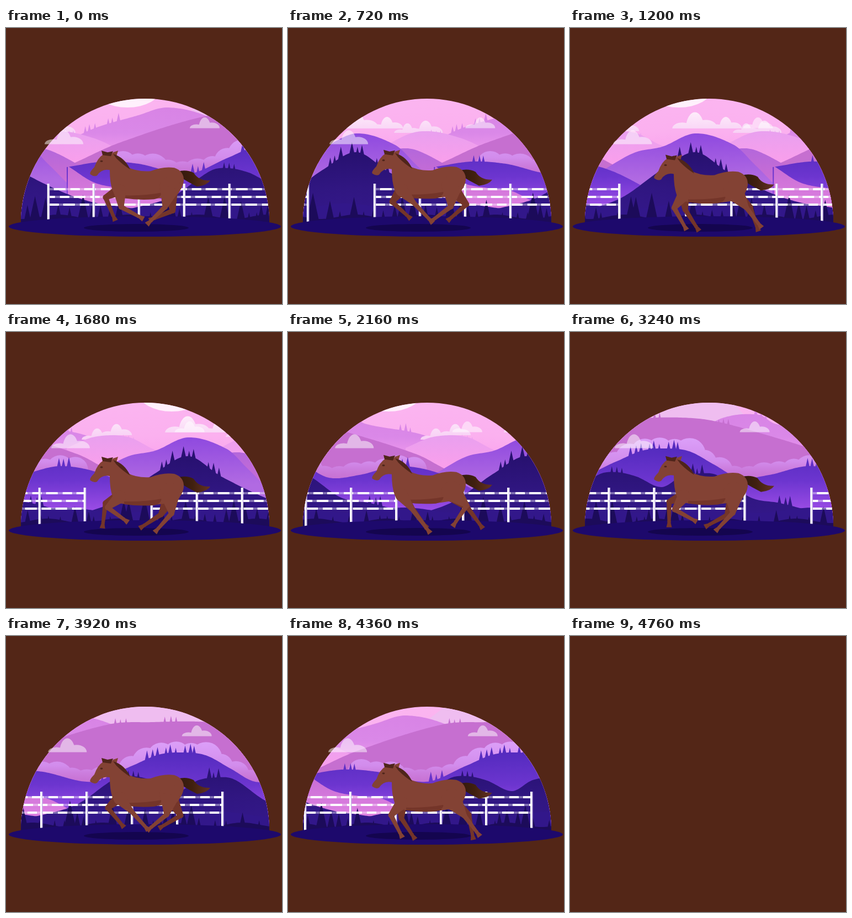
Write an HTML page with a canvas that moves like this. It is 500x500 px and loops after 4800 ms.

```html
<!DOCTYPE html>
<html lang="en">
<head>
<meta charset="utf-8">
<style>
  html, body { margin: 0; height: 100%; overflow: hidden; background: #532617; }
  canvas { display: block; }
</style>
</head>
<body>
<canvas id="stage" width="500" height="500"></canvas>
<script>
const c = document.getElementById('stage').getContext('2d');
const LOOP = 4800, VISIBLE = 4760, STRIDE = VISIBLE / 6;
const PANORAMA = 1014, FENCE = 531, TAU = 2 * Math.PI;

let seed = 7;
const random = () => (seed = seed * 16807 % 2147483647) / 2147483647;
const wave = (phase, peak) => Math.cos(TAU * (phase - peak));

function vertical(y0, y1, ...colors) {
  const g = c.createLinearGradient(0, y0, 0, y1);
  colors.forEach((col, i) => g.addColorStop(i / (colors.length - 1), col));
  return g;
}

// Height function through [x, y] points (Hermite spline)
function spline(points) {
  const slope = i => {
    const a = points[Math.max(i - 1, 0)], b = points[Math.min(i + 1, points.length - 1)];
    return (b[1] - a[1]) / (b[0] - a[0]);
  };
  return x => {
    const i = Math.max(0, points.findLastIndex((p, n) => p[0] <= x && n < points.length - 1));
    const [x0, y0] = points[i], [x1, y1] = points[i + 1];
    const w = x1 - x0, t = (x - x0) / w, s = 1 - t;
    return y0 * s * s * (1 + 2 * t) + y1 * t * t * (3 - 2 * t) + w * s * t * (s * slope(i) - t * slope(i + 1));
  };
}

function tree(path, x, base, h, spread) {
  path.moveTo(x - h * spread, base);
  path.lineTo(x, base - h);
  path.lineTo(x + h * spread, base);
}

function land(from, to, height) {
  const path = new Path2D();
  path.moveTo(from, 365);
  for (let x = from; x <= to; x += 3) path.lineTo(x, height(x));
  path.lineTo(to, 365);
  path.closePath();
  return path;
}

// A hill with small groves of trees standing on its ridge
function hill(fill, points, groves = [], size = 8) {
  const height = spline(points);
  const path = land(points[0][0], points[points.length - 1][0], height);
  for (const x of groves)
    for (let i = -1; i < 2; i++) {
      const tx = x + i * 9 + random() * 3;
      tree(path, tx, height(tx) + 4, size * (.8 + random()) + 4, .22);
    }
  return { fill, path, height };
}

function cloud(x, base, w, path = new Path2D()) {
  for (const [dx, rx, h] of [[-.28, .22, .13], [0, .2, .36], [.24, .26, .19]]) {
    path.moveTo(x + (dx - rx) * w, base);
    path.ellipse(x + dx * w, base, rx * w, h * w, 0, Math.PI, TAU);
  }
  return path;
}

const farClouds = new Path2D();
for (const [x, base, w] of [[-31, 182, 82], [25, 182, 58], [95, 190, 62], [62, 190, 48], [-160, 187, 56], [-195, 195, 56]])
  cloud(x, base, w, farClouds);

const glow = new Path2D();
for (const x of [-281, -60, 220]) {
  glow.moveTo(x + 60, 110);
  glow.ellipse(x, 110, 60, 34, 0, 0, TAU);
}

const purple = hill(vertical(213, 325, '#552bbf', '#6c35cf', '#9d4de6'),
  [[110, 252], [178, 242], [240, 246], [330, 264], [400, 236], [450, 215], [490, 211], [535, 216], [580, 240],
    [625, 264], [680, 259], [752, 243], [830, 258], [930, 310]], [347, 437, 470, 505, 756, 190], 10);

// Puffs that follow the purple ridge
const mist = new Path2D();
for (let x = 212; x < 790; x += 27) {
  const r = 21 + random() * 9, y = purple.height(x) + 5;
  mist.moveTo(x - r, 285);
  mist.lineTo(x - r, y);
  mist.arc(x, y, r, Math.PI, TAU);
  mist.lineTo(x + r, 285);
}

const meadow = land(0, PANORAMA, x => 323 + 5 * Math.sin(TAU * 5 * x / PANORAMA));
const thicket = land(0, PANORAMA, x => 342 + 4 * Math.sin(TAU * 8 * x / PANORAMA));
for (let x = 0; x < PANORAMA; x += 8 + random() * 24)
  tree(thicket, x, 350, 16 + 36 * random() ** 2, .22);

const lightFill = vertical(145, 235, '#d884e5', '#da88e8', '#f39dee');
const darkFill = vertical(230, 350, '#281171', '#301681', '#34188b');
const layers = [
  { fill: '#fff0fc', path: glow },
  hill('#efbdf0', [[315, 165], [385, 120], [600, 120], [655, 175]]),
  hill(lightFill, [[70, 235], [145, 188], [240, 158], [292, 144], [365, 160], [430, 200]], [150, 192]),
  hill(lightFill, [[544, 185], [598, 155], [662, 150], [690, 166], [794, 186], [874, 220], [934, 260]], [663, 762]),
  { fill: vertical(145, 195, '#fff2fc', '#f7cdf4'), path: farClouds },
  hill(vertical(185, 250, '#e8a0ef', '#fb9feb'),
    [[-250, 210], [-200, 190], [-140, 190], [-85, 215], [-10, 225], [80, 188], [160, 200], [240, 240]], [-140, 112], 3),
  hill('#c66fd0', [[70, 265], [118, 247], [205, 208], [360, 160], [440, 156], [519, 155], [574, 160], [660, 182],
    [785, 222], [840, 250], [900, 272]], [380, 470, 595], 6),
  hill(vertical(220, 320, '#b467db', '#c86dd4', '#dc7fe0'), [[-30, 235], [55, 218], [90, 226], [180, 275], [300, 330]]),
  hill(vertical(190, 275, '#8e49df', '#b16ae2'),
    [[-205, 262], [-141, 226], [-90, 215], [-30, 191], [40, 212], [75, 245], [110, 280]]),
  { fill: vertical(190, 280, '#dca0f9', '#d28cec', '#c66fd000'), path: mist },
  purple,
  hill(vertical(250, 320, '#c86dd4', '#dc7fe0'), [[112, 250], [160, 280], [215, 291], [250, 295], [290, 314], [330, 325]]),
  hill(darkFill, [[215, 330], [300, 306], [372, 258], [404, 254], [440, 262], [485, 281], [520, 262], [545, 257],
    [585, 259], [647, 300], [700, 310], [770, 328]], [404, 549, 707], 11),
  hill(darkFill, [[-245, 335], [-165, 308], [-90, 256], [-30, 225], [30, 262], [125, 306], [220, 330]], [-70, -30, 15], 11),
  { fill: '#32178a', path: meadow },
  { fill: '#1c0b5a', path: thicket }
];

function panorama(t) {
  const shift = t * .2144 % PANORAMA;
  c.fillStyle = vertical(128, 250, '#fbb5f0', '#fbb0ef', '#f99eec');
  c.fillRect(20, 120, 465, 240);
  for (const { fill, path } of layers)
    for (const x of [shift - PANORAMA, shift]) {
      c.save();
      c.translate(x, 0);
      c.fillStyle = fill;
      c.fill(path);
      c.restore();
    }
}

function fence(t) {
  const shift = t * .1113 % FENCE;
  c.lineWidth = 4;
  for (const x of [76.7 + shift - FENCE, 76.7 + shift]) {
    for (let row = 0; row < 3; row++)
      for (const [color, dash] of [['#ffffff60', []], ['#fff', [21, 9, 17, 8]]]) {
        c.strokeStyle = color;
        c.setLineDash(dash);
        c.lineDashOffset = row * 19 - 10;
        c.beginPath();
        c.moveTo(x, 292 + row * 14);
        c.lineTo(x + 410, 292 + row * 14);
        c.stroke();
      }
    for (let post = x; post <= x + 410; post += 82) {
      c.fillStyle = '#fff';
      c.fillRect(post - 2, 282, 4, 70);
      c.fillStyle = '#c5b5e6';
      c.fillRect(post + 1, 282, 1.5, 70);
    }
  }
}

function ellipse(fill, x, y, rx, ry) {
  c.fillStyle = fill;
  c.beginPath();
  c.ellipse(x, y, rx, ry, 0, 0, TAU);
  c.fill();
}

function taper(x0, y0, w0, x1, y1, w1) {
  const a = Math.atan2(y1 - y0, x1 - x0), s = Math.sin(a) / 2, k = Math.cos(a) / 2;
  c.beginPath();
  c.moveTo(x0 + s * w0, y0 - k * w0);
  c.lineTo(x1 + s * w1, y1 - k * w1);
  c.lineTo(x1 - s * w1, y1 + k * w1);
  c.lineTo(x0 - s * w0, y0 + k * w0);
  c.fill();
}

// The ankle swings on an ellipse; the joint between is solved from the two bone lengths
function leg(phase, color, { hip: [hx, hy], width, bones: [upper, lower], bend, x, swing, forward, y, lift, raised }, dy) {
  hy += dy;
  const ax = x + swing * wave(phase, forward), ay = y - lift * wave(phase, raised);
  const d = Math.hypot(ax - hx, ay - hy), ux = (ax - hx) / d, uy = (ay - hy) / d;
  const along = Math.min((d * d + upper * upper - lower * lower) / (2 * d), upper);
  const out = bend * Math.sqrt(upper * upper - along * along);
  const kx = hx + ux * along + uy * out, ky = hy + uy * along - ux * out;
  const l = Math.hypot(ax - kx, ay - ky);
  ellipse(color, hx, hy, width / 2, width / 2);
  taper(hx, hy, width, kx, ky, 10);
  ellipse(color, kx, ky, 5, 5);
  taper(kx, ky, 9, ax, ay, 6);
  ellipse(color, ax, ay, 3.2, 3.2);
  taper(ax, ay, 5, ax + (ax - kx) / l * 10, ay + (ay - ky) / l * 10, 10);
}

const front = { bones: [29, 36], bend: -1 }, hind = { bones: [37, 36], bend: 1 };
const farFront = { ...front, hip: [206, 293], width: 21, x: 210, swing: 37, forward: .68, y: 350, lift: 11, raised: .93 };
const nearFront = { ...front, hip: [206, 295], width: 23, x: 222, swing: 38, forward: .83, y: 349, lift: 10, raised: .11 };
const farHind = { ...hind, hip: [298, 294], width: 27, x: 302, swing: 52, forward: .64, y: 352, lift: 9, raised: .9 };
const nearHind = { ...hind, hip: [297, 288], width: 38, x: 302, swing: 40, forward: .48, y: 352, lift: 9, raised: .8 };

const body = new Path2D(`M176 229 L190 230 L194 225 L203 222 L200 232 Q212 240 219 251 Q238 261 262 259
  Q285 250 305 253 Q323 259 322 277 Q319 298 300 304 Q268 313 216 308 Q198 306 193 294 Q188 280 188 257
  Q173 254 165 267 Q160 270 153 265 Q150 262 160 252 Q166 235 176 229`);
const tailShape = new Path2D('M310 260 Q326 255 340 262 Q349 277 370 276 Q364 285 346 287 Q330 279 314 269');
const maneShape = new Path2D('M175 230 L173 222 L184 225 L194 223 L190 232 M194 228 Q215 234 225 256 Q212 248 200 236');
const bellyShade = new Path2D('M214 303 Q252 304 282 298 Q280 308 268 310 Q240 312 214 308');

function horse(t) {
  const phase = t / STRIDE % 1, coat = '#834234', shade = '#743529', mane = '#4f251a';
  const bob = 4 - 5.5 * wave(phase, .87);
  leg(phase, shade, farFront, bob);
  leg(phase, shade, farHind, bob);

  c.save();
  c.translate(0, bob);
  const tail = c.createLinearGradient(316, 0, 370, 0);
  tail.addColorStop(0, '#351a0e');
  tail.addColorStop(.4, '#40200f');
  tail.addColorStop(1, '#653223');
  for (const [fill, path] of [[tail, tailShape], [coat, body], [mane, maneShape], [shade, bellyShade]]) {
    c.fillStyle = fill;
    c.fill(path);
  }
  ellipse(mane, 173, 241, 2.5, 1.6);
  c.restore();

  leg(phase, coat, nearFront, bob);
  leg(phase, coat, nearHind, bob);
}

function render(t) {
  c.fillStyle = '#532617';
  c.fillRect(0, 0, 500, 500);
  if (t >= VISIBLE) return;
  c.save();
  c.beginPath();
  c.arc(252, 353, 225, Math.PI, 0);
  c.lineTo(477, 360);
  c.lineTo(27, 360);
  c.clip();
  panorama(t);
  fence(t);
  c.restore();

  const drift = 1 - Math.abs(1 - t / 2400);
  c.fillStyle = '#ffffff80';
  c.fill(cloud(105 + 17 * drift, 210.5, 70));
  c.fill(cloud(360 - 39 * drift, 181.5, 54));

  ellipse('#1d096c', 251.5, 359.5, 246.5, 18.5);
  ellipse('#14054f', 236, 362, 95, 7);
  horse(t);
}

function tick() {
  render(Math.floor(performance.now() % LOOP / 40) * 40);
  requestAnimationFrame(tick);
}
tick();
</script>
</body>
</html>
```
